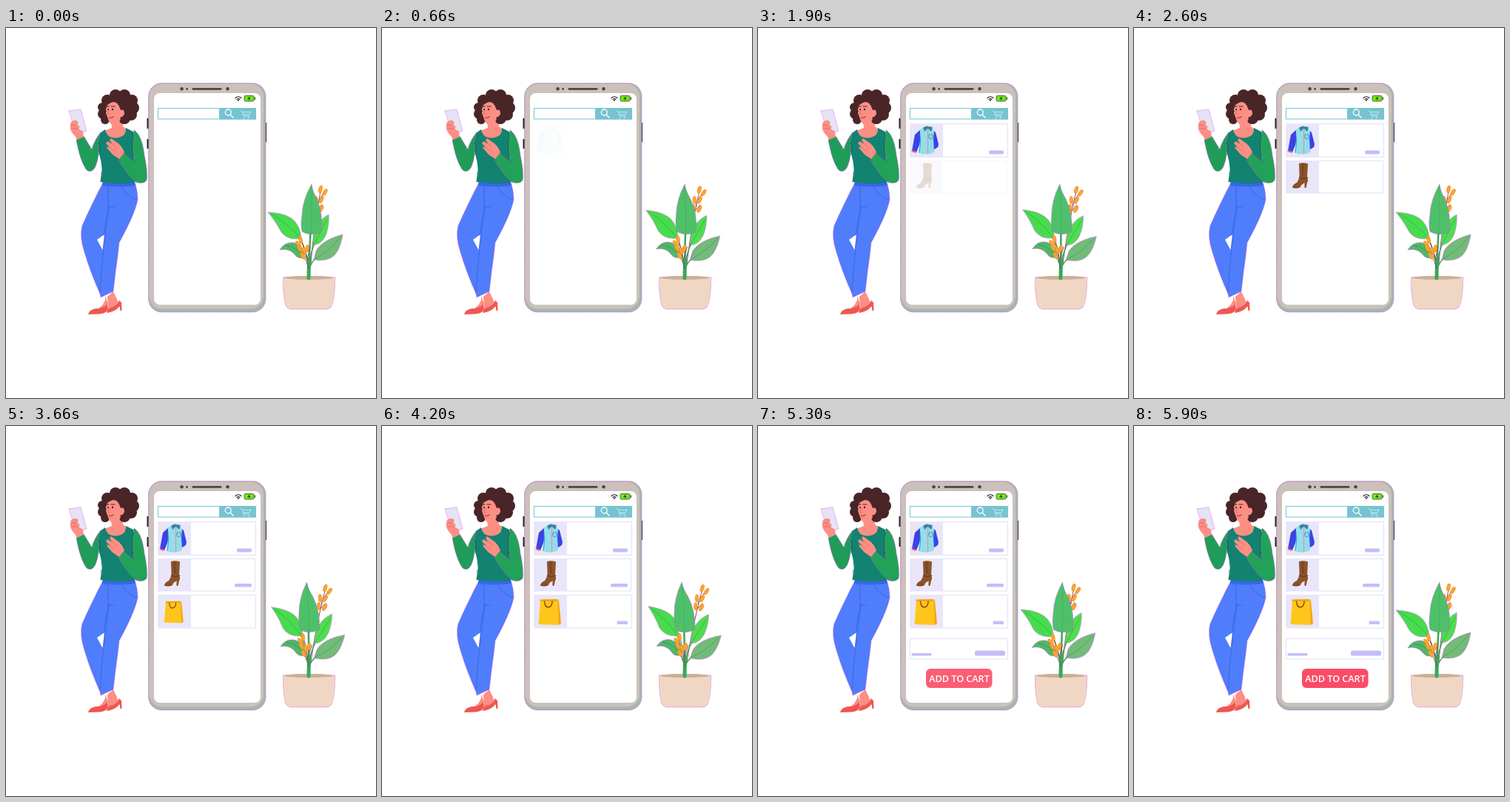
An HTML page for the animation above (6 s loop, 500 px wide and 500 px high).

```html
<!DOCTYPE html>
<html lang="en">
<head>
<meta charset="utf-8">
<title>Shopping on a phone</title>
<style>
  html, body { margin: 0; width: 100%; height: 100%; overflow: hidden; background: #fff; }
  svg { display: block; width: 100vw; height: 100vh; }
  .edge { stroke: #e23cf0; stroke-width: .7; stroke-dasharray: 1.4 1.1; }
  .line { fill: none; stroke-linecap: round; stroke-linejoin: round; }
  .skin { fill: #fb8f84; }
  .card { fill: #fff; stroke: #e3e0f7; }
  .pane { fill: #e9e6fa; }
  .bar { fill: #c5bdf8; }
  .bud { fill: #fba52f; stroke: #e8862a; stroke-width: .6; }
</style>
</head>
<body>
<svg viewBox="0 0 500 500">
  <g id="woman">
    <!-- shoes and ankles -->
    <path class="skin" d="M134 362L138 373L132 379L121 382L130 375L134 368ZM137 363L145 356L152 371L146 378L138 380Z"/>
    <g fill="#f0564f">
      <path d="M111 387Q113 380 122 379Q130 380 137 373L138 381Q134 386 126 386.500Z"/>
      <path d="M136 385Q138 377 145 377Q151 374 153 368L156 371L156.500 382L154.500 382L153.500 376Q147 384 136 385Z"/>
    </g>
    <!-- trousers -->
    <path class="edge" fill="#4f7dfb" d="M131 209Q114 242 103 267Q99 282 106 303Q114 330 127 359L128 364L145 356L148 330Q151 310 153 290Q174 252 178 232Q178 220 174 209Z"/>
    <path fill="#fff" d="M123 286L133 279L130.500 300Z"/>
    <g class="line" stroke="#3564dd" stroke-width=".8">
      <path d="M138 214Q139 250 134 280Q129 320 127 357M140 240Q134 260 132 280M155 213Q164 228 176 232M138 242H146"/>
    </g>
    <path fill="#3767ea" d="M131 207H174L175 213Q152 216 130 213Z"/>
    <!-- neck and jumper -->
    <path class="skin" d="M142 126L157 117L158 133L164 137Q160 150 148 150Q136 150 133 139L143 135Z"/>
    <path fill="#128271" d="M134 137L127 142Q121 156 126 170Q132 190 128 208Q150 212 174 209Q175 196 172 180V140L162 135Q163 147 149 148.500Q136 149 134 137Z"/>
    <path class="edge" fill="#1f9d58" d="M128 141Q119 152 116 164L105 146L95 151Q100 180 109 192Q116 197 121 187Q127 172 125 154Z"/>
    <path class="edge" fill="#22a258" d="M173 138Q184 145 187 172Q192 196 190 206Q185 212 175 208Q163 198 152 178L160 169Q167 178 173 180Q169 158 173 138Z"/>
    <path class="line" stroke="#0d5f50" stroke-width=".8" d="M172 142Q168 164 173 181M126 155Q128 164 126 171M129 195Q129 203 128 208"/>
    <!-- hands and handset -->
    <path class="skin" d="M160 168Q156 158 149 154L142 149L140 152L144 157L137 153L135 156L141 162L136 160L137 163L144 171L153 177Z"/>
    <path class="line" stroke="#d95f62" stroke-width=".7" d="M144 157L149 162M141 162L146 166"/>
    <path class="edge" fill="#e5e4f4" d="M85 112L101 110L109 139L95 143Z"/>
    <path class="skin" d="M88 127Q95 122 98 128L96 131L100 133L98 136L104 140L105 147L96 151Q93 145 89 141Q85 134 88 127Z"/>
    <path class="line" stroke="#d95f62" stroke-width=".7" d="M89 131L96 131M89 136L98 136"/>
    <!-- head -->
    <g id="curls" fill="#4a2527"></g>
    <path class="skin" d="M137 104Q148 95 153 106L155 111Q160 109 160 116Q158 121 155 120Q155 128 147 131Q140 131 138 123L135 115Z"/>
    <path class="line" stroke="#4a2527" d="M136.500 106.500L139 105.700M142 106L147 106"/>
    <path class="line" stroke="#d95f62" stroke-width=".8" d="M139 111L137.500 116L140 116.500"/>
    <path class="line" stroke="#c62f3f" stroke-width="1.300" d="M139.500 121Q142 122.500 145 120"/>
    <circle cx="144" cy="110" r="1.200" fill="#2d1719"/>
    <circle cx="138" cy="110" r="1" fill="#2d1719"/>
  </g>

  <g id="handset">
    <path fill="#222" d="M190.500 122H193V136H190.500ZM190.500 150H193V163H190.500ZM349 128H352V154H349Z"/>
    <rect class="edge" x="192.500" y="74.500" width="158.500" height="309.500" rx="18" fill="#a1b8ad"/>
    <rect x="193.500" y="75.500" width="154.500" height="304" rx="17" fill="#ccc0bb"/>
    <rect x="200" y="88" width="144" height="286" rx="8" fill="#fff"/>
    <g fill="#4d4645">
      <circle cx="237.500" cy="82.300" r="2.300"/><circle cx="244.500" cy="82.300" r="1.500"/>
      <circle cx="299.500" cy="82.300" r="2.300"/><rect x="251.500" y="81" width="40" height="2.800" rx="1.400"/>
    </g>
    <path class="line" stroke="#222" stroke-width="1.200" d="M310 94.500Q314 91 318 94.500M312 96.500Q314 94.700 316 96.500"/>
    <circle cx="314" cy="98" r=".9" fill="#222"/>
    <rect x="322" y="91.500" width="13" height="7.500" rx="1.500" fill="#74e516" stroke="#4d5d45" stroke-width=".9"/>
    <path fill="#4d5d45" d="M335.500 93.500H337V97H335.500Z"/>
    <path fill="#234516" d="M329.500 92L326 96H328.500L327.500 98.500L331 94.700H328.700Z"/>
    <rect x="205.500" y="108.500" width="132" height="14.500" fill="#fff" stroke="#76c3d1"/>
    <path fill="#76c3d1" d="M288 108H338V123.500H288Z"/>
    <g class="line" stroke="#fff">
      <path stroke-width="1.400" d="M303 117L307 121"/><circle cx="300.300" cy="114" r="4" stroke-width="1.300"/>
      <path stroke="#c3e6ec" d="M317 111.500L319 112.500L321 119H329M319.500 113.500H331L329 117H321"/>
    </g>
    <g fill="#c3e6ec"><circle cx="322" cy="121.500" r="1"/><circle cx="328" cy="121.500" r="1"/></g>
  </g>

  <g id="shirt">
    <rect class="card" x="205.500" y="129.500" width="132" height="45"/>
    <path class="pane" d="M205 129H250V175H205Z"/>
    <path fill="#3a43e8" d="M220 137L212 144L208 166L214 168L221 151ZM235 137L240 141L244 157L243 161L235 166L232 160L237 156L234 148Z"/>
    <path fill="#ef5c72" d="M208 165L214 167L213.500 169L207.500 167Z"/>
    <path fill="#8fdfec" d="M219 137L225 134H234L238 139L237 150L238 168Q229 173 217 169L219 152Z"/>
    <path fill="#3e83a5" d="M223 134.500L228 132.500L236 134L234 140L229.500 136L225 140Z"/>
    <path class="line" stroke="#ef8a9c" stroke-width="1.200" d="M229.500 138V170"/>
    <path class="line" stroke="#3e83a5" stroke-width=".8" d="M231.500 144H236V149L233.800 150L231.500 149ZM219 144Q221 155 218 168"/>
  </g>
  <g id="boot">
    <rect class="card" x="205.500" y="179.500" width="131" height="43.500"/>
    <path class="pane" d="M205 179H250V223H205Z"/>
    <path fill="#8b5228" d="M223 183Q229 181.500 235 183.500L234 201Q236 206 234 209L232.500 216H230.500L230.500 209Q227 211 224 215Q219 217.500 214 215Q215 211 220 209Q223 205 223.500 200Z"/>
    <path class="line" stroke="#5d3216" stroke-width=".9" d="M223.500 202Q229 205 235 202M214.500 215.500Q221 217 225 214.500M228 184V198"/>
  </g>
  <g id="tote">
    <rect class="card" x="205.500" y="228.500" width="132" height="44.500"/>
    <path class="pane" d="M205 228H250V273H205Z"/>
    <g id="toteArt">
      <path fill="#f5a20c" d="M237 234L239 236L242 267L238 269Z"/>
      <path fill="#ffc51a" d="M214 234.500L237.500 234L239 269L211.500 268Z"/>
      <path fill="#f5a20c" d="M214 234.500L237.500 234L237.600 236.500L213.800 237Z"/>
      <path class="line" stroke="#8d4b1c" stroke-width="1.500" d="M219.500 237Q220 245 225 245Q230 244 230 237"/>
    </g>
  </g>
  <g id="total"><rect class="card" x="205.500" y="287.500" width="132" height="27.500"/></g>
  <g id="bars"></g>
  <g id="cta">
    <rect x="227" y="328" width="89.500" height="26" rx="6" fill="#fb4c67"/>
    <text x="272" y="346" text-anchor="middle" fill="#fff" font-family="'Open Sans', Lato, sans-serif" font-weight="600" font-size="12.600">ADD TO CART</text>
  </g>

  <g id="plant">
    <path class="edge" fill="#f0d7c3" d="M374.500 337Q409 334 444.500 337Q445 362 440 376Q438 380 432 380H386Q379 380 377 372Q374 356 374.500 337Z"/>
    <ellipse cx="409" cy="337.500" rx="33" ry="2.600" fill="#cbb097"/>
    <g data-turn="4.500" data-pivot="412 318">
      <path class="line" stroke="#8a3f5b" stroke-width=".9" d="M412 318Q416 270 424 226L427 214M423 232L430 222M420 247L427 238M422 240L418 230"/>
      <g class="buds" data-at="425,218,12 431,222,30 419,232,-5 426,232,25 418,243,-5 426,244,25"></g>
    </g>
    <g data-turn="5.500" data-pivot="411 312">
      <path class="line" stroke="#3d9b55" stroke-width="1.500" d="M410 320Q412 302 417 291"/>
      <path class="edge" fill="#4fdd50" d="M436 252Q414 264 415 293Q427 293 433 278Q437 265 436 252Z"/>
      <path class="line" stroke="#2fae4a" stroke-width=".8" d="M434 258Q425 276 416 293"/>
    </g>
    <g data-turn="5.200" data-pivot="411 318">
      <path class="line" stroke="#3d9b55" stroke-width="1.500" d="M410 326Q412 317 418 312"/>
      <path class="edge" fill="#72bb78" d="M455 279Q428 286 419 301L416 313Q438 317 447 303Q453 293 455 279Z"/>
      <path class="line" stroke="#4f9b61" stroke-width=".8" d="M452 282Q436 303 417 312"/>
    </g>
    <g data-turn="6.300" data-pivot="405 300">
      <path class="line" stroke="#3d9b55" stroke-width="1.500" d="M396 282Q403 292 408 316"/>
      <path class="edge" fill="#47dc4e" d="M354 249Q380 250 390 261Q398 270 399 284Q382 288 372 276Q365 262 354 249Z"/>
      <path class="line" stroke="#2fae4a" stroke-width=".8" d="M358 251Q382 265 397 283"/>
    </g>
    <g data-turn="3.500" data-pivot="409 320">
      <path class="edge" fill="#4fb866" d="M370 300Q376 289 388 290Q402 293 404 309Q396 314 390 306Q382 297 370 300Z"/>
      <path class="line" stroke="#36975a" stroke-width=".9" d="M378 294Q394 296 403 309L408 322"/>
    </g>
    <path class="line" stroke="#3aa75b" stroke-width="5" d="M409 338Q409 325 410 312"/>
    <g data-turn="-4.200" data-pivot="409 320">
      <path class="line" stroke="#3aa75b" stroke-width="2.500" d="M409.500 322Q410 300 411.500 276"/>
      <path class="edge" fill="#4fc06a" d="M413 211Q401 232 400 252Q398 266 400 275Q412 282 426 276Q429 252 420 231Q414 220 413 211Z"/>
      <path class="line" stroke="#43ae62" stroke-width=".8" d="M413 214Q414 248 412 278"/>
    </g>
    <g data-turn="6" data-pivot="409 325">
      <path class="line" stroke="#8a3f5b" stroke-width=".9" d="M409 325Q406 304 398 284M407 312L411 296M404 303L395 292"/>
      <g class="buds" data-at="398,286,-12 395,292,-40 397,298,-30 403,301,-20 407,298,10 401,308,-30"></g>
    </g>
  </g>
</svg>
<script>
const LOOP = 6000;
const $ = id => document.getElementById(id);

function add(parent, tag, attrs) {
  const el = document.createElementNS('http://www.w3.org/2000/svg', tag);
  for (const name in attrs) el.setAttribute(name, attrs[name]);
  parent.appendChild(el);
  return el;
}

const curls = [[137, 98, 8], [148, 91, 8], [160, 91, 8], [170, 98, 8], [172, 108, 8], [169, 117, 8],
  [160, 122, 8], [130, 107, 6], [131, 116, 7], [134, 124, 6], [154, 106, 16]];
for (const [cx, cy, r] of curls) add($('curls'), 'circle', { cx, cy, r });

for (const group of document.querySelectorAll('.buds')) {
  for (const place of group.dataset.at.split(' ')) {
    const [cx, cy, tilt] = place.split(',');
    add(group, 'ellipse', { class: 'bud', cx, cy, rx: 2.3, ry: 5, transform: `rotate(${tilt} ${cx} ${cy})` });
  }
}

// x, y, width, height, start, end
const bars = [[312, 165.5, 20, 5, 1400, 1750], [309, 213, 23, 4.5, 2750, 3100], [317.5, 263.5, 14.5, 4.5, 3850, 4200],
  [207.5, 307, 27, 3.5, 4500, 5050], [293, 303.5, 41, 7, 4500, 5050]
].map(([x, y, width, height, start, end]) => ({
  el: add($('bars'), 'rect', { class: 'bar', x, y, height, rx: Math.min(2.5, height / 3) }), width, start, end
}));

const fades = [['shirt', 650, 1150], ['boot', 1800, 2300], ['tote', 3000, 3500], ['total', 4250, 4650], ['cta', 4850, 5350]]
  .map(([id, start, end]) => ({ el: $(id), start, end }));

const leaves = [...document.querySelectorAll('[data-turn]')];
const swayTimes = [0, 1350, 2700, 4050, 5800, LOOP + 1550];

const progress = (t, start, end) => Math.min(1, Math.max(0, (t - start) / (end - start)));
const ease = p => (1 - Math.cos(Math.PI * p)) / 2;

// Swings 0 → 1 → 0 between successive turning times.
function swayAt(t) {
  let i = 0;
  while (t >= swayTimes[i + 1]) i++;
  const p = ease(progress(t, swayTimes[i], swayTimes[i + 1]));
  return i % 2 ? 1 - p : p;
}

function render(t) {
  for (const { el, start, end } of fades) el.setAttribute('opacity', progress(t, start, end));
  for (const { el, width, start, end } of bars) el.setAttribute('width', width * progress(t, start, end));

  const scale = 0.8 + 0.2 * ease(progress(t, 3500, 4000));
  $('toteArt').setAttribute('transform', `translate(227 251.5) scale(${scale}) translate(-227 -251.5)`);

  const sway = swayAt(t);
  for (const el of leaves) el.setAttribute('transform', `rotate(${el.dataset.turn * sway} ${el.dataset.pivot})`);
}

const origin = performance.now();
function tick() {
  render((performance.now() - origin) % LOOP);
  requestAnimationFrame(tick);
}
tick();
</script>
</body>
</html>
```
